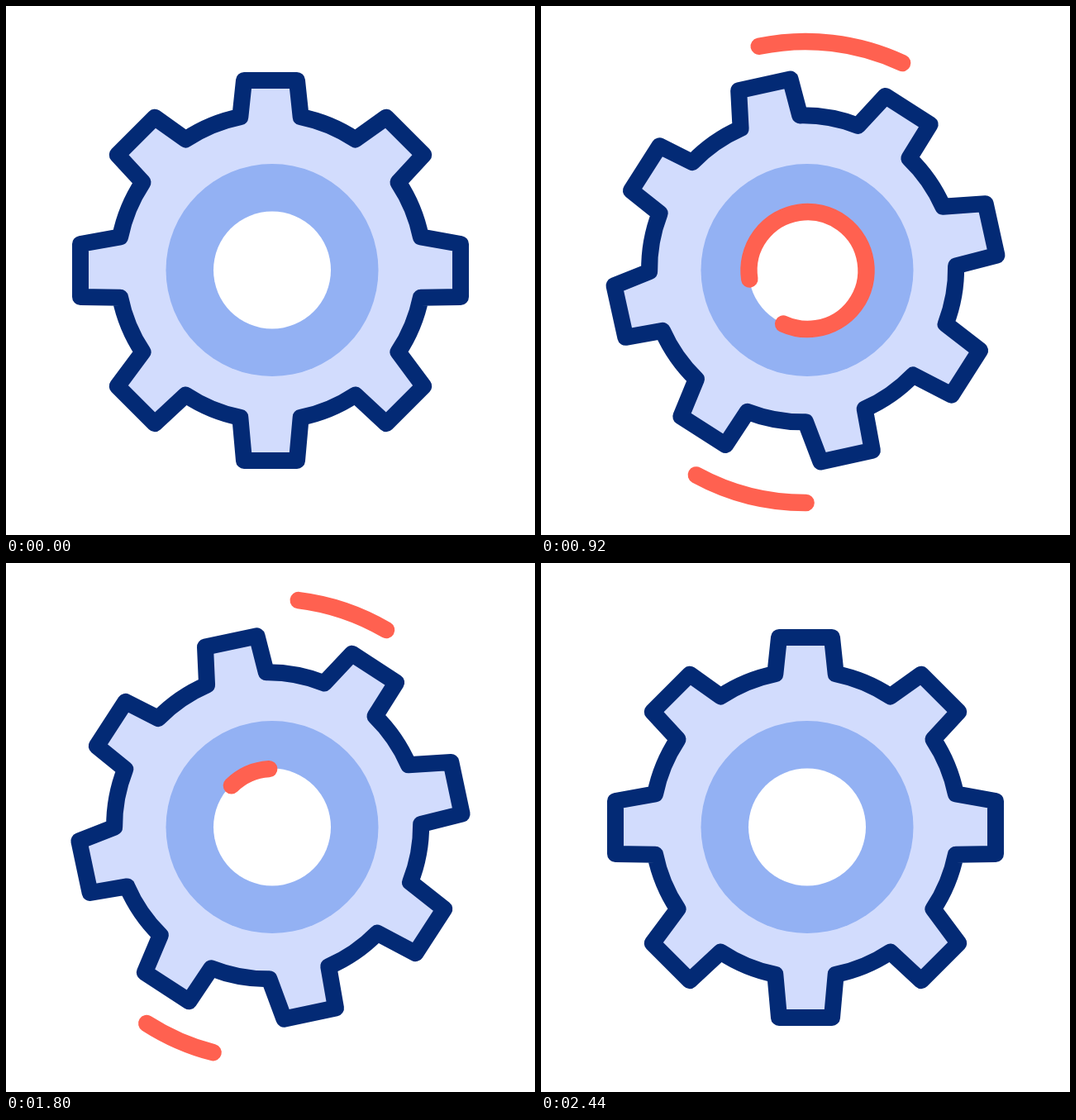
These frames come from a looping animation (640 px wide and 640 px high, 2480 ms). An HTML page with a canvas:

```html
<!DOCTYPE html>
<html lang="en">
<head>
<meta charset="utf-8">
<title>Turning gear</title>
<style>
  html, body { margin: 0; width: 100%; height: 100%; overflow: hidden; background: #fff; }
  canvas { display: block; width: 100vw; height: 100vh; object-fit: contain; }
</style>
</head>
<body>
<canvas id="stage" width="640" height="640"></canvas>
<script>
const ctx = document.getElementById('stage').getContext('2d');
const LOOP = 2480, STEP = 40;
const NAVY = '#032a75', PALE = '#d2dcfd', BLUE = '#93b1f3', RED = '#ff6150';
const RAD = Math.PI / 180;

// Bezier easing with flat ends; x1 and x2 set how long it lingers at each end.
function ease(x, x1, x2) {
  let low = 0, high = 1;
  for (let i = 0; i < 24; i++) {
    const s = (low + high) / 2, r = 1 - s;
    if (3 * x1 * s * r * r + 3 * x2 * s * s * r + s ** 3 < x) low = s;
    else high = s;
  }
  return low * low * (3 - 2 * low);
}

// Progress from 0 to 1 between two times.
function progress(t, start, end, x1, x2) {
  const x = Math.min(1, Math.max(0, (t - start) / (end - start)));
  return ease(x, x1, x2);
}

const SWING = -112;

function gearTurn(t) {
  return SWING * (progress(t, 0, 1200, 0.936, 0.761) - progress(t, 1200, 2389, 0.593, 0.429));
}

// The outer arcs start ahead of the gear, and each returns to its own rest angle.
function sweepTurn(t, rest) {
  const start = 37;
  const out = progress(t, 300, 1200, 0.705, 0.516);
  const back = progress(t, 1200, 2295, 0.748, 0.526);
  return start + (SWING - start) * out + (rest - SWING) * back;
}

function sweepGrowth(t) {
  return 1.1 * (progress(t, 530, 1180, 0.06, 0.704) - progress(t, 1180, 2060, 0.733, 0.754));
}

function ringLength(t) {
  return 360 * (progress(t, 280, 1160, 0.397, 0.596) - progress(t, 1160, 2200, 0.28, 0.236));
}

function ringDrift(t) {
  return 360 * progress(t, 0, 1460, 0.51, 1);
}

// Eight equal teeth around the stage centre, standing on a body set slightly higher.
function makeGear() {
  const path = new Path2D();
  const teeth = 8, bodyY = -4, bodyR = 185.5, baseHalf = 11.4;
  const tipR = 232.2, tipHalf = 7.92;
  const pitch = 360 / teeth;
  for (let i = 0; i < teeth; i++) {
    const middle = i * pitch - 90;
    for (const side of [-1, 1]) {
      const angle = (middle + side * tipHalf) * RAD;
      path.lineTo(tipR * Math.cos(angle), tipR * Math.sin(angle));
    }
    path.arc(0, bodyY, bodyR, (middle + baseHalf) * RAD, (middle + pitch - baseHalf) * RAD);
  }
  path.closePath();
  return path;
}
const gear = makeGear();

function disc(radius, color) {
  ctx.fillStyle = color;
  ctx.beginPath();
  ctx.arc(322, 319.5, radius, 0, 2 * Math.PI);
  ctx.fill();
}

// Angles in degrees, clockwise from the top.
function redArc(x, y, radius, from, length) {
  if (length <= 0.05) return;
  ctx.strokeStyle = RED;
  ctx.lineWidth = 20.5;
  ctx.beginPath();
  ctx.arc(x, y, radius, (from - 90) * RAD, (from + length - 90) * RAD);
  ctx.stroke();
}

function draw(t) {
  const turn = gearTurn(t), growth = sweepGrowth(t), length = ringLength(t);
  ctx.fillStyle = '#fff';
  ctx.fillRect(0, 0, 640, 640);
  ctx.lineCap = ctx.lineJoin = 'round';

  ctx.save();
  ctx.translate(320, 320);
  ctx.rotate(turn * RAD);
  ctx.fillStyle = PALE;
  ctx.fill(gear);
  ctx.strokeStyle = NAVY;
  ctx.lineWidth = 20;
  ctx.stroke(gear);
  ctx.restore();

  disc(128.5, BLUE);
  disc(71, '#fff');

  redArc(322.5, 320, 71, 53.5 + turn - ringDrift(t) - length, length);
  redArc(320, 320, 277, 63.7 + sweepTurn(t, 37), 46.6 * growth);
  redArc(320, 324, 277, 255.3 + sweepTurn(t, 26), 36.3 * growth);
}

function frame() {
  const t = performance.now() % LOOP;
  draw(Math.floor(t / STEP) * STEP);
  requestAnimationFrame(frame);
}
frame();
</script>
</body>
</html>
```
